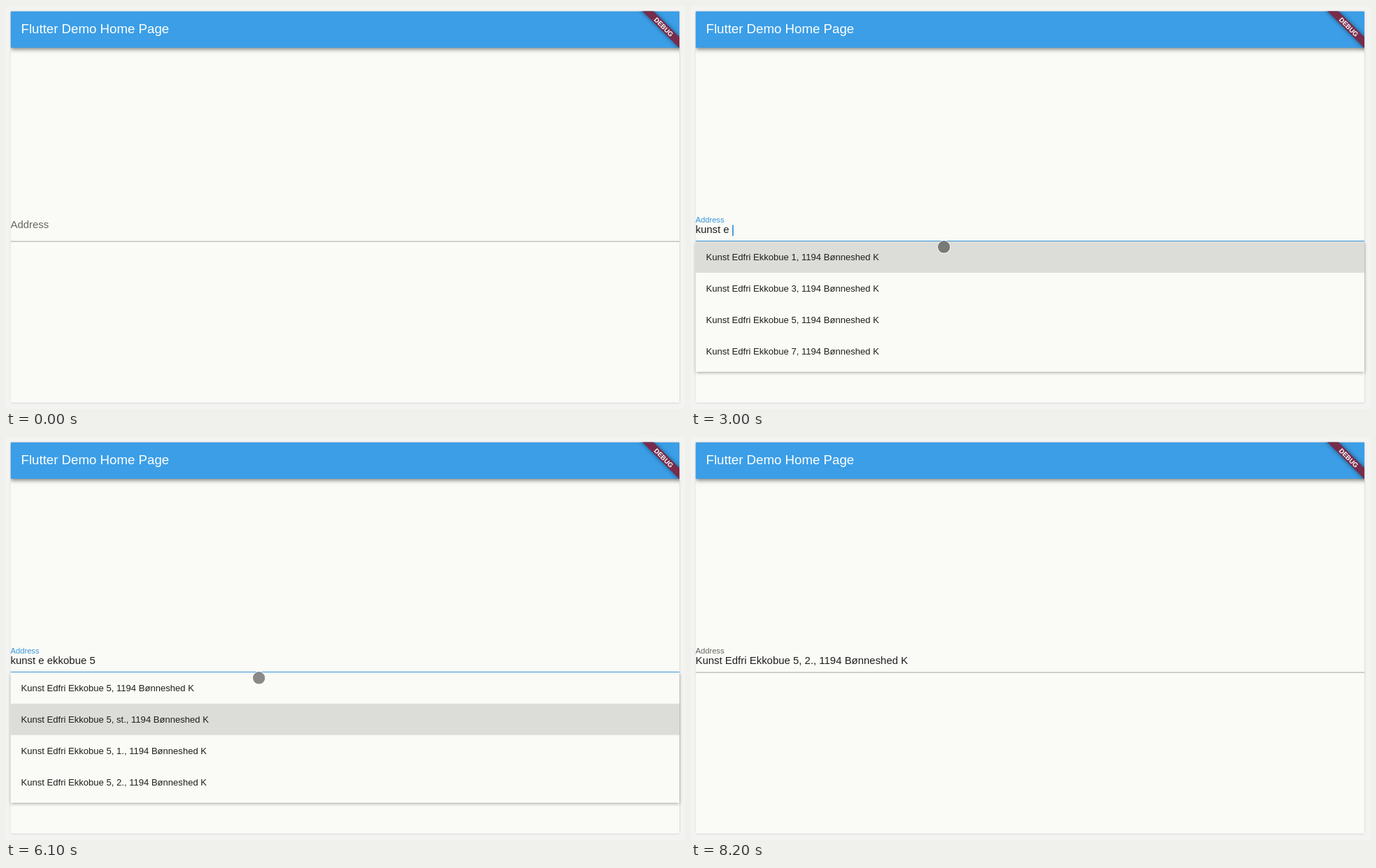
An HTML page with a canvas for the animation above (9.9 s loop, 971 by 577 pixels).

```html
<!DOCTYPE html>
<html lang="en">
<head>
<meta charset="utf-8">
<title>Address autocomplete</title>
<style>
html, body { margin: 0; width: 100%; height: 100%; overflow: hidden; background: #f3f3f2; }
canvas { display: block; width: 971px; height: 577px; }
</style>
</head>
<body>
<canvas id="stage"></canvas>
<script>
const W = 971, H = 577, LOOP = 9900, STEP = 50;
const S = 0.934;                       // logical pixel of the app
const L = 6.5, T = 7.5, R = 963, B = 567.8;
const LIST_TOP = 337, LIST_H = 200 * S, ROW = 48 * S;
const PAPER = '#fafaf6', INK = '#1e1e1d', BLUE = [53, 149, 220], GREY = [100, 100, 98];
const FACE = '"Liberation Sans", Arial, sans-serif';

const canvas = document.getElementById('stage');
const ratio = window.devicePixelRatio || 1;
canvas.width = W * ratio;
canvas.height = H * ratio;
const ctx = canvas.getContext('2d');

const street = 'Kunst Edfri Ekkobue';
const town = ', 1194 Bønneshed K';
const lists = {
  none: [],
  road: ['1', '2', '4', '8'].map(n => `Kunhebarvej ${n}, 6697 Neshard`),
  square: ['1', '1V', '2', '2C'].map(n => `Kunst Ebnes ${n}, 4008 Nukvilbo`),
  arc: ['1', '3', '5', '7'].map(n => `${street} ${n}${town}`),
  floors: ['', ', st.', ', 1.', ', 2.', ', 3.', ', 4.'].map(f => `${street} 5${f}${town}`)
};

// [time, value] tracks; each value holds until the next time
const query = 'kunst e ekkobue 5 ';
const typed = [[1050, 0], [1800, 1], [1900, 3], [2300, 4], [2350, 5], [2450, 6], [2650, 7],
  [3000, 8], [3150, 9], [3300, 10], [3350, 11], [3500, 12], [4600, 13], [4700, 14],
  [4750, 15], [4850, 16], [5500, 17], [5600, 18]];
const shown = [[0, 'none'], [2000, 'road'], [2400, 'arc'], [2500, 'square'], [2700, 'arc'],
  [3200, 'none'], [3400, 'square'], [4650, 'arc'], [5550, 'floors'], [7050, 'none']];
const picked = [[0, 0], [6050, 1], [6400, 2], [6550, 3]];
const leaving = [[7800, [370, 341]], [8050, [355, 260]], [8100, [325, 140]], [8150, [290, 23]]];

const last = (track, t) => track.filter(k => k[0] <= t).pop();
const clamp = v => Math.min(1, Math.max(0, v));
const mix = (a, b, p) => a + (b - a) * p;
const blend = (a, b, p) => `rgb(${a.map((v, i) => Math.round(mix(v, b[i], p)))})`;
const ease = p => p * p * (3 - 2 * p);

function rect(x, y, w, h, color) {
  ctx.fillStyle = color;
  ctx.fillRect(x, y, w, h);
}

function text(str, x, y, size, color) {
  ctx.font = `${size}px ${FACE}`;
  ctx.fillStyle = color;
  ctx.fillText(str, x, y);
}

function raised(x, y, w, h, color, alpha, blur, dy) {
  ctx.save();
  ctx.shadowColor = `rgba(0,0,0,${alpha})`;
  ctx.shadowBlur = blur * ratio;
  ctx.shadowOffsetY = dy * ratio;
  rect(x, y, w, h, color);
  ctx.restore();
}

function clipTo(x, y, w, h) {
  ctx.beginPath();
  ctx.rect(x, y, w, h);
  ctx.clip();
}

function banner() {
  ctx.save();
  ctx.translate(R, T);
  ctx.rotate(Math.PI / 4);
  ctx.scale(S, S);
  ctx.shadowColor = 'rgba(0,0,0,0.5)';
  ctx.shadowBlur = 6 * ratio;
  rect(-60, 28, 120, 12, '#782c4b');
  ctx.shadowColor = 'transparent';
  ctx.font = `bold 10.2px ${FACE}`;
  ctx.textAlign = 'center';
  ctx.fillStyle = '#fff';
  ctx.fillText('DEBUG', 0, 37.6);
  ctx.restore();
}

function field(t) {
  const focus = t < 7000 ? ease(clamp((t - 1000) / 250)) : 1 - clamp((t - 7000) / 150);
  const float = t < 7000 ? focus : 1;
  const on = t >= 1050 && t < 7150;
  text('Address', L, mix(317.8, 310.2, float), mix(16, 12, float) * S, blend(GREY, BLUE, focus));
  rect(L, on ? 336 : 336.6, R - L, on ? 1.9 : 1, blend(on ? GREY : [165, 165, 162], BLUE, focus));

  if (t >= 7050) {
    text(`${street} 5, 2.${town}`, L, 325.2, 16 * S, INK);
  } else if (t >= 1050) {
    const [since, count] = last(typed, t);
    const value = query.slice(0, count);
    text(value, L, 325.2, 16 * S, INK);
    if (Math.floor((t - since) / 500) % 2 === 0) {
      rect(L + ctx.measureText(value).width + 0.2, 313.5, 1.8, 15.8, '#3595dc');
    }
  }
}

function options(t) {
  const items = lists[last(shown, t)[1]];
  if (!items.length) return;
  const row = last(picked, t)[1];
  const max = Math.max(0, items.length * 48 - 200);
  const offset = Math.min(max, Math.max(0, row * 48 + 24 - 100)) * S;

  ctx.save();
  clipTo(0, LIST_TOP, W, H);
  raised(L, LIST_TOP, R - L, LIST_H, PAPER, 0.42, 5, 1.6);
  clipTo(L, LIST_TOP, R - L, LIST_H);
  items.forEach((item, i) => {
    const y = LIST_TOP + i * ROW - offset;
    if (i === row) rect(L, y, R - L, ROW, '#dcddd8');
    text(item, 21.5, y + 27.1, 14 * S, INK);
  });
  if (t >= 6550) {
    const full = items.length * ROW;
    rect(953.5, LIST_TOP + offset * LIST_H / full, 7.5, LIST_H * LIST_H / full, 'rgba(0,0,0,0.1)');
  }
  ctx.restore();
}

function pointer(t) {
  if (t < 450 || t >= 8200) return;
  let x = 361.7, y = 345;
  if (t < 700) {
    const p = ease((t - 450) / 250);
    x = mix(312, x, p);
    y = mix(65.5, y, p);
  } else if (t >= 7800) {
    [x, y] = last(leaving, t)[1];
  }
  ctx.beginPath();
  ctx.arc(x, y, 8.8, 0, Math.PI * 2);
  ctx.fillStyle = 'rgba(0,0,0,0.45)';
  ctx.fill();
  ctx.beginPath();
  ctx.arc(x, y, 9.2, 0, Math.PI * 2);
  ctx.strokeStyle = 'rgba(255,255,255,0.75)';
  ctx.lineWidth = 1;
  ctx.stroke();
}

function draw(t) {
  ctx.setTransform(ratio, 0, 0, ratio, 0, 0);
  rect(0, 0, W, H, '#f3f3f2');
  raised(L, T, R - L, B - T, PAPER, 0.28, 3, 0.5);
  ctx.save();
  clipTo(L, T, R - L, B - T);
  raised(L, T, R - L, 52.3, '#3b9ee7', 0.5, 6, 1.8);
  text('Flutter Demo Home Page', 21.5, 38.8, 20 * S, '#fff');
  field(t);
  ctx.restore();
  options(t);
  ctx.save();
  clipTo(L, T, R - L, B - T);
  banner();
  ctx.restore();
  pointer(t);
}

const start = performance.now();
function tick() {
  const t = (performance.now() - start) % LOOP;
  draw(Math.floor(t / STEP) * STEP);
  requestAnimationFrame(tick);
}
tick();
</script>
</body>
</html>
```
